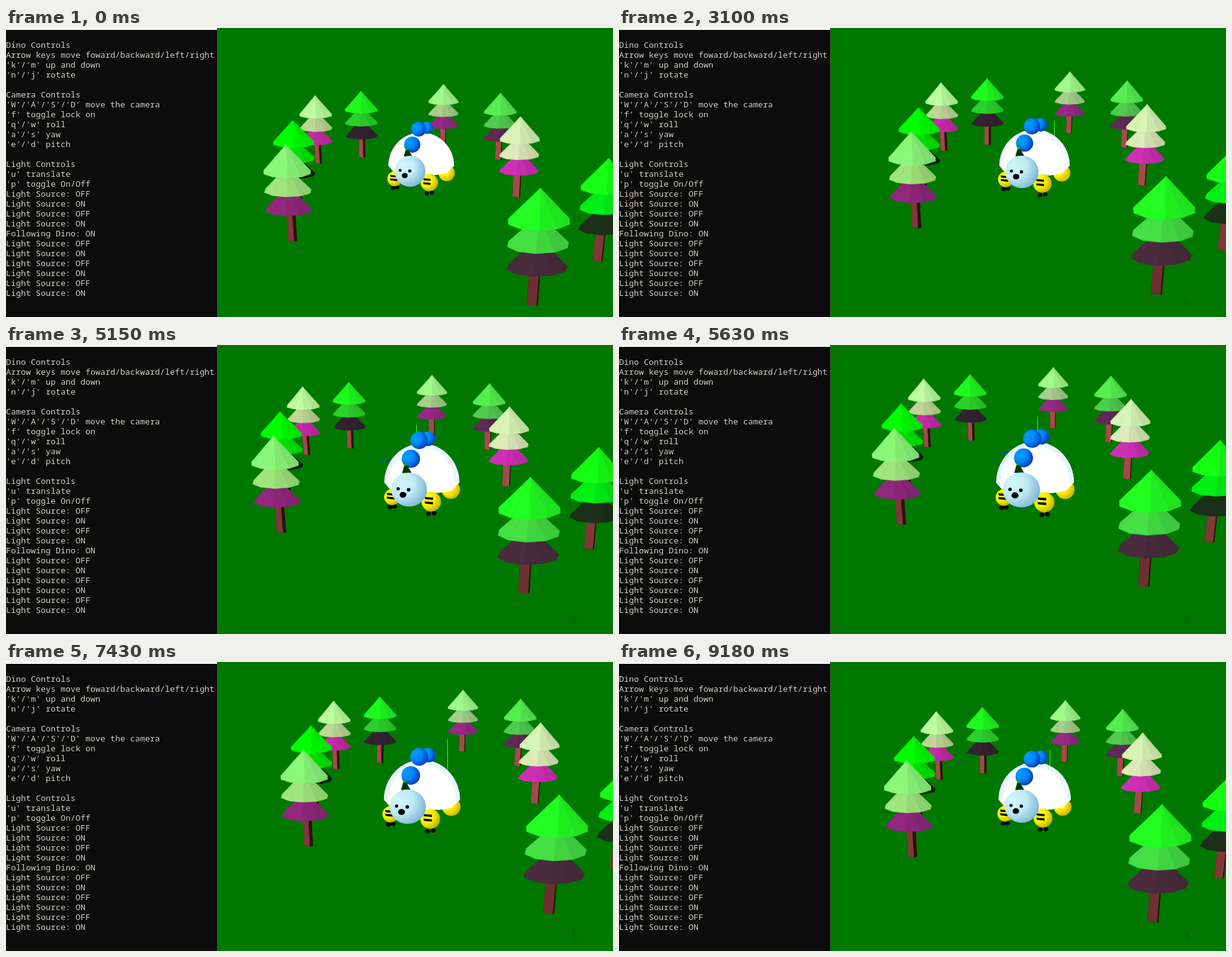
Write an HTML page with a canvas that moves like this. It is 978 px wide and 466 px high and loops after 9.27 s.

```html
<!DOCTYPE html>
<html lang="en">
<head>
<meta charset="utf-8">
<title>Dino scene</title>
<style>
html, body { margin: 0; width: 100%; height: 100%; overflow: hidden; background: #007800; }
#stage { position: relative; width: 978px; height: 466px; overflow: hidden; }
canvas { position: absolute; left: 0; top: 0; }
#console { position: absolute; left: 0; top: 0; width: 340px; height: 466px; background: #0c0c0c;
  border-right: 1px solid #444; overflow: hidden; }
#console::before { content: ""; position: absolute; left: 0; top: 0; width: 341px; height: 3px; background: #fff; }
pre { position: absolute; left: 0; top: 19px; margin: 0; color: #d2cdc2;
  font: 13.333px/16px "Noto Sans Mono", "DejaVu Sans Mono", monospace; }
</style>
</head>
<body>
<div id="stage">
<canvas id="view" width="978" height="466"></canvas>
<div id="console"><pre>Dino Controls
Arrow keys move foward/backward/left/right
'k'/'m' up and down
'n'/'j' rotate

Camera Controls
'W'/'A'/'S'/'D' move the camera
'f' toggle lock on
'q'/'w' roll
'a'/'s' yaw
'e'/'d' pitch

Light Controls
'u' translate
'p' toggle On/Off
Light Source: OFF
Light Source: ON
Light Source: OFF
Light Source: ON
Following Dino: ON
Light Source: OFF
Light Source: ON
Light Source: OFF
Light Source: ON
Light Source: OFF
Light Source: ON</pre></div>
</div>
<script>
const LOOP = 9270;
const ctx = document.getElementById('view').getContext('2d');

// start ms, end ms, steps, then scene offset at the first and last step
const MOVES = [
  [2410, 3300, 14, 2.5, -2.5, 27, -26],
  [3370, 3510, 3, 27, -28, 28, -33],
  [4040, 4590, 9, 28, -33, -21, -40],
  [5150, 5770, 10, -19, -41.5, 1, -60.5],
  [6290, 6430, 3, 8, -60, 22, -59],
  [6500, 6760, 4, 24.5, -58, 31, -54],
  [7220, 7430, 4, 31, -52, 31, -46],
  [7500, 7990, 8, 29, -44, 14, -29]
];

// tip x, tip y, foot x, foot y, half width, hues of the three tiers
const TREES = [
  [705, 91, 704, 190, 24, '#a2fa8c', '#a6cf8c', '#962a86'],
  [572, 102, 574, 209, 26, '#1efa1e', '#2ad22a', '#342232'],
  [797, 105, 793, 213, 26, '#55f050', '#50cd50', '#5f2a55'],
  [498, 109, 504, 219, 26, '#beffa0', '#bed796', '#c82aaa'],
  [829, 143, 822, 273, 32, '#d9f5b6', '#dcebb9', '#cf2fb6'],
  [462, 149, 471, 277, 33, '#00ff00', '#00eb00', '#0a1e0a'],
  [451, 188, 462, 344, 38, '#8cf87a', '#a0e67d', '#91287d'],
  [971, 210, 953, 377, 42, '#14ff14', '#00f014', '#1c3019'],
  [861, 258, 848, 448, 50, '#22fd22', '#44e044', '#4a2c3e']
];

const mix = (a, b, u) => a + (b - a) * u;

function offsetAt(t) {
  let pos = [0, 0];
  for (const [a, b, n, x0, y0, x1, y1] of MOVES) {
    if (t < a) break;
    const u = Math.min(n - 1, Math.floor((t - a) / (b - a) * (n - 1) + 1e-6)) / (n - 1);
    pos = [mix(x0, x1, u), mix(y0, y1, u)];
  }
  return pos;
}

// camera shift of a scene point; nearer points swing differently
function project(x, y, dx, dy) {
  const near = (x - 500) * y * 1e-6;
  return [
    x + dx * (1 - Math.max(0, y - 150) * 0.0007) - (x - 650) * dy * 0.00018,
    y + dy * (1 + 0.3 * near) + dx * 1.2 * near
  ];
}

function tone(hex, k) {
  const n = parseInt(hex.slice(1), 16);
  return `rgb(${[n >> 16, n >> 8 & 255, n & 255].map(v => Math.round(v * k))})`;
}

function poly(pts, fill, seam) {
  ctx.beginPath();
  pts.forEach(p => ctx.lineTo(p[0], p[1]));
  ctx.closePath();
  ctx.fillStyle = fill;
  ctx.fill();
  if (seam) {
    ctx.strokeStyle = fill;
    ctx.lineWidth = 0.6;
    ctx.stroke();
  }
}

function line(x0, y0, x1, y1, color) {
  ctx.beginPath();
  ctx.moveTo(x0, y0);
  ctx.lineTo(x1, y1);
  ctx.strokeStyle = color;
  ctx.lineWidth = 1;
  ctx.stroke();
}

function cone(tip, [cx, cy], w, h, turn, hue) {
  const N = 10, step = Math.PI * 2 / N;
  for (let i = 0; i < N; i++) {
    const a = turn + i * step, b = a + step, m = a + step / 2;
    const p = [cx + w * Math.cos(a), cy + h * Math.sin(a)];
    const q = [cx + w * Math.cos(b), cy + h * Math.sin(b)];
    const facing = (p[0] - tip[0]) * (q[1] - tip[1]) - (p[1] - tip[1]) * (q[0] - tip[0]);
    if (facing <= 0) continue;
    const k = 1 - 0.11 * Math.max(0, Math.cos(m - 0.3));
    poly([tip, p, q], tone(hue, k), true);
  }
}

function tree([x, y, fx, fy, w, ...hues], dx, dy) {
  const at = (u, side = 0, lean = 1) =>
    project(mix(x, fx, u * lean) + side, mix(y, fy, u), dx, dy);
  const tw = (fy - y) * 0.048, flat = w * (0.2 + (y - 100) * 0.0006);
  const edge = x < 700 ? tw * 0.3 : tw * 0.75;
  const bark = y > 250 ? '#6c3030' : y > 180 ? '#803838' : '#a44a4c';
  poly([at(0.6, -tw), at(0.6, tw), at(0.995, tw), at(1, edge), at(0.99, -tw)], '#2c1012');
  poly([at(0.6, -tw), at(0.6, edge), at(1, edge), at(0.99, -tw)], bark);
  for (let i = 2; i >= 0; i--) {
    const tip = at([0, 0.225, 0.42][i], 0, 0.6), base = at([0.285, 0.48, 0.675][i], 0, 0.6);
    cone(tip, base, w * (1.04 - i * 0.02), flat, -0.33 + i * 0.08, hues[i]);
  }
}

function ball(x, y, r, light, main, dark, ry = r) {
  const g = ctx.createRadialGradient(x - r * 0.5, y - r * 0.35, r * 0.1, x - r * 0.3, y - r * 0.25, r * 1.3);
  g.addColorStop(0, light);
  g.addColorStop(0.5, main);
  g.addColorStop(1, dark);
  ctx.beginPath();
  ctx.ellipse(x, y, r, ry, 0, 0, 7);
  ctx.fillStyle = g;
  ctx.fill();
}

function dot(x, y, rx, ry = rx) {
  ctx.beginPath();
  ctx.ellipse(x, y, rx, ry, 0, 0, 7);
  ctx.fillStyle = '#000';
  ctx.fill();
}

function shell(h) {
  const cx = mix(669, 670.5, h), rx = mix(53, 63.5, h), ry = mix(53.5, 67, h);
  const b = mix(15, 17, h) / ry;
  const dome = new Path2D();
  dome.ellipse(cx, 222, rx, ry, 0, Math.PI, Math.PI * 2);
  const body = new Path2D(dome);
  for (const [u, v] of [[0.78, 0.8], [0.45, 1], [-0.55, 1], [-0.85, 0.65]]) {
    body.lineTo(cx + rx * u, 222 + ry * b * v);
  }
  body.closePath();
  ctx.save();
  ctx.fillStyle = '#fff';
  ctx.fill(body);
  ctx.clip(body);
  ctx.strokeStyle = `rgba(228,245,252,${Math.min(0.85, h * 1.6)})`;
  ctx.lineWidth = 15;
  ctx.stroke(dome);
  ctx.restore();
}

function dino(h, dx) {
  const lean = (22 * h - dx) * 0.04;
  const m = (a, b) => mix(a, b, h);
  const blue = ['#009cff', '#0088ff', '#0040b8'];
  const yellow = ['#ffff10', '#fcf400', '#c4b400'];
  const s = m(1, 1.2);

  ball(m(710, 719.5), m(234, 233), m(13, 15.5), '#ffff00', '#fff000', '#d0b800');
  shell(h);
  ball(m(678, 681), m(161, 147), m(10, 12.5), ...blue);
  ball(m(665, 666), m(163, 150), m(12, 15), ...blue);
  ball(m(654.5, 651.5), m(188, 181.5), m(13, 15.5), ...blue);

  // horn
  const hx = m(645.5, 641) + lean * 0.7, hy = m(191, 187);
  poly([[hx, hy], [hx + 9 * s, hy + 16 * s], [hx - 4.5 * s, hy + 16 * s]], '#003800');
  poly([[hx, hy], [hx + 3 * s, hy + 5 * s], [hx - 1.5 * s, hy + 6 * s]], '#00c000');

  foot(m(626.5, 618.5) + lean, m(243, 246), m(12, 13.5), -2);
  foot(m(682, 684.5) + lean, m(249, 254), m(14, 16.5), -4);

  const x = m(651, 647) + lean, y = m(231, 234);
  ball(x, y, m(25, 30.5), '#d2f5fa', '#bfebf5', '#84b8d6', m(25, 28.5));
  dot(m(635, 628.5) + lean, m(229.5, 233), 2.3 * s);
  dot(m(650.5, 646) + lean, m(230.5, 234.5), 2.5 * s);
  dot(m(642.5, 636.5) + lean, m(238, 243), 4.8 * s, 4.2 * s);

  function foot(x, y, r, bx) {
    for (const cx of [-0.28, 0.3]) dot(x + r * cx, y + r * 1.22 - cx * 2, 3.4 * s, 3 * s);
    ball(x, y, r, ...yellow);
    for (const v of [-0.34, 0.12]) {
      const by = y + r * v, l = x + bx - 6 * s, e = x + bx + 6 * s;
      poly([[l, by - 2 * s], [e, by - 1 * s], [e, by + 2.2 * s], [l + 1, by + 1.2 * s]], '#000');
    }
  }
}

function draw(t) {
  const [dx, dy] = offsetAt(t), h = -dy / 59;
  ctx.fillStyle = '#007800';
  ctx.fillRect(0, 0, 978, 466);
  if (t >= 120) {
    poly([[912, 433], [923, 444], [918, 445], [921, 451], [918, 452], [915, 447], [912, 449]], '#006c00');
  }
  TREES.forEach(a => tree(a, dx, dy));
  const ox = Math.floor(680 + dx) + 0.5, oy = Math.floor(228 + dy) + 0.5;
  line(ox, oy - 58, ox, oy, '#3cf03c');
  line(ox - 60, oy, ox, oy, '#0040c0');
  dino(h, dx);
}

function tick() {
  draw(performance.now() % LOOP);
  requestAnimationFrame(tick);
}
tick();
</script>
</body>
</html>
```
